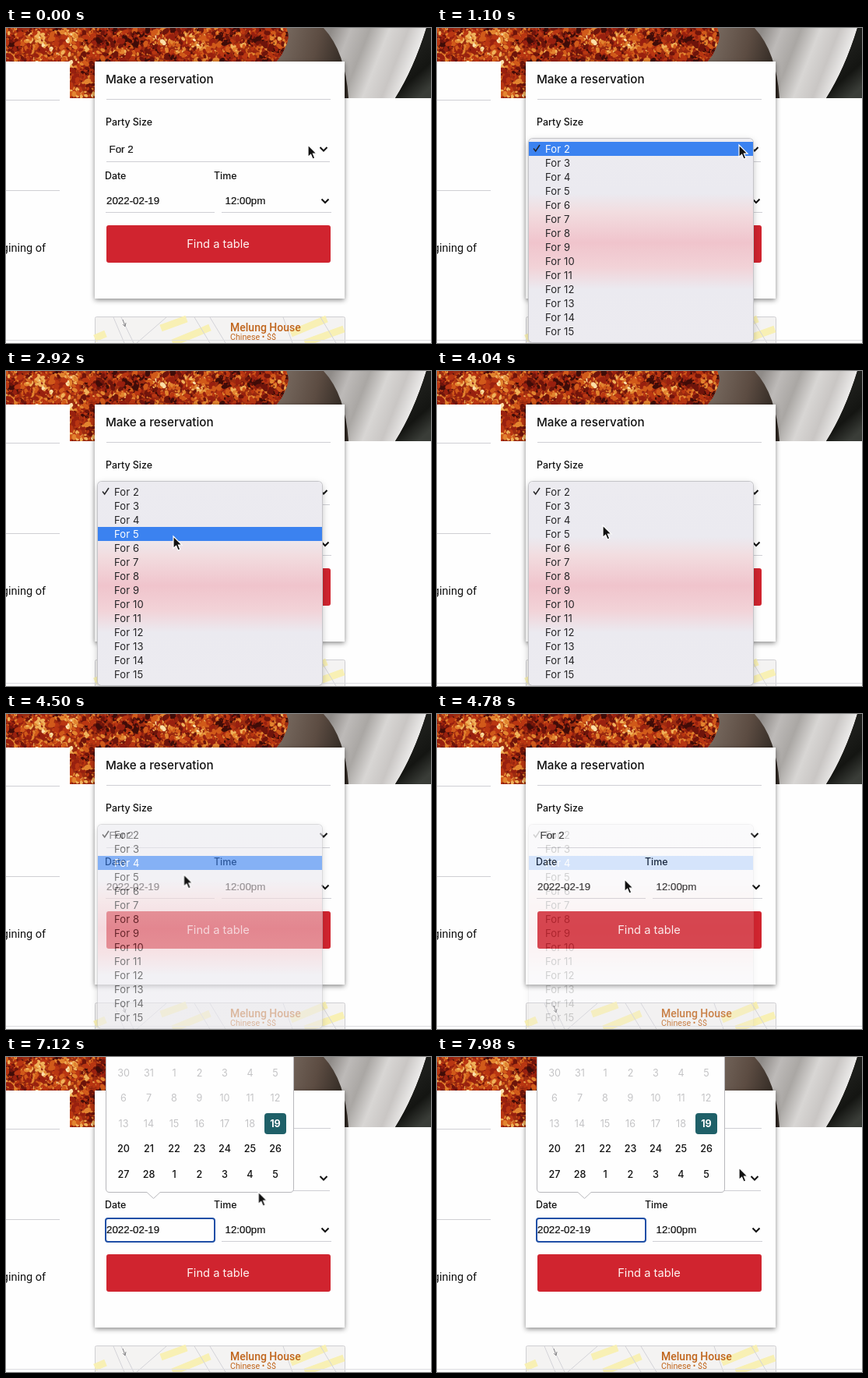
An HTML page with a canvas for the animation above (8 s loop, 546 by 404 pixels).

```html
<!DOCTYPE html>
<html lang="en">
<head>
<meta charset="utf-8">
<title>Table reservation</title>
<style>
  html, body { margin: 0; width: 100%; height: 100%; overflow: hidden; background: #fefefe; }
  #stage { position: absolute; inset: 0; width: 546px; height: 404px; overflow: hidden; }
  #stage > * { position: absolute; left: 0; top: 0; }
  svg { overflow: visible; }
  text { font-family: Inter, sans-serif; fill: #111; }
  .label { font-size: 12.4px; font-weight: 500; }
  .value { font: 13.33px "Liberation Sans", Arial, sans-serif; stroke: #111; stroke-width: .2px; }
  .rule { stroke: #cfcfd4; }
  .ring { fill: #fefefe; stroke: #1f4fa6; stroke-width: 2; }
  .chevron { fill: none; stroke: #111; stroke-width: 2; }
  .place { font-family: Roboto, sans-serif; fill: #c0651c; }
  .day { font-size: 12.6px; font-weight: 500; text-anchor: middle; }
  .muted { fill: #c4c4c6; font-weight: 400; }
  .chosen { fill: #fff; font-weight: 700; }

  #menu {
    left: 118px; top: 142px; width: 288px; height: 261px; border-radius: 5px;
    font: 13px/18px Inter, sans-serif; letter-spacing: .15px; color: #242426;
    background: linear-gradient(#ecebf0, #ebeaf0 27%, #f2dde0 36%, #f0c4cc 51%, #f2d2d7 63%, #ebeaf0 74%, #ecebf0);
    box-shadow: 0 0 0 1px #c4c4c8, 0 3px 10px #0004;
  }
  #menu ul {
    position: absolute; inset: 0; margin: 0; padding: 4px 0 0 21px;
    list-style: none; border-radius: 5px;
  }
  #menu .lit {
    color: #fff; background: #3b82f0;
    clip-path: inset(calc(4px + 18px * var(--row)) 0 calc(239px - 18px * var(--row)));
  }
  #menu svg { position: absolute; left: 5px; top: 7px; }

  /* One shared 8 s timeline */
  #menu, .lit, .before, .after, .focus, .opened, #cursor, .arrow, .beam {
    animation: 8s linear infinite;
  }
  #menu { animation-name: menu; }
  #menu .lit { animation-name: pick; animation-timing-function: step-end; }
  .before, .after, .focus, .opened, .arrow, .beam { animation-timing-function: step-end; }
  .before { animation-name: before; }
  .after { animation-name: after; }
  .focus { animation-name: focus; }
  .opened { animation-name: opened; }
  .arrow { animation-name: arrow; }
  .beam { animation-name: beam; }
  #cursor { animation-name: move; }

  @keyframes menu {
    0%, 13.74% { opacity: 0; }
    13.75%, 53% { opacity: 1; }
    61.5%, 100% { opacity: 0; }
  }
  @keyframes pick {
    0% { --row: 0; }
    16.7% { --row: 1; }
    19.5% { --row: 2; }
    22.3% { --row: 3; }
    48.5% { --row: 2; }
    50% { --row: 20; }
    51.25%, 100% { --row: 2; }
  }
  @keyframes before { 0% { opacity: 1; } 62%, 100% { opacity: 0; } }
  @keyframes after { 0% { opacity: 0; } 62%, 100% { opacity: 1; } }
  @keyframes focus { 0% { opacity: 0; } 62% { opacity: 1; } 76.5%, 100% { opacity: 0; } }
  @keyframes opened { 0% { opacity: 0; } 76.5%, 100% { opacity: 1; } }
  @keyframes arrow { 0% { opacity: 1; } 62% { opacity: 0; } 84%, 100% { opacity: 1; } }
  @keyframes beam { 0% { opacity: 0; } 62% { opacity: 1; } 84%, 100% { opacity: 0; } }
  @keyframes move {
    0%, 14.4% { transform: translate(388px, 150px); }
    24.25% { transform: translate(262px, 212px); }
    36.5% { transform: translate(215px, 212px); }
    50.5%, 52% { transform: translate(213px, 198px); }
    59.75% { transform: translate(241px, 212px); }
    70.25% { transform: translate(230px, 219px); }
    79% { transform: translate(230px, 219px); animation-timing-function: ease-in-out; }
    97%, 100% { transform: translate(388px, 142px); }
  }
</style>
</head>
<body>
<div id="stage">
  <canvas id="photo" width="546" height="90"></canvas>

  <svg width="546" height="404">
    <rect y="43" width="82" height="361" fill="#fefefe"/>
    <path class="rule" d="M0 92.5H69M0 208.5H69"/>
    <text x="51" y="287" text-anchor="end" style="font:14.5px Roboto,sans-serif">gining of</text>

    <g id="map">
      <rect x="114.500" y="370.500" width="321" height="40" rx="2" fill="#f4f3f2" stroke="#cfcfd2"/>
      <g fill="none" stroke="#f8f0b4" stroke-width="9">
        <path d="M114 398L128 392M199 385L232 373M214 404L262 384M366 392L412 373M384 404L434 386"/>
      </g>
      <g fill="none" stroke="#d3d3d8">
        <path d="M138 371L152 404M148 371L164 404M168 404L206 371M242 371L262 404M262 371L282 404M356 371L368 404M404 371L424 404"/>
      </g>
      <path d="M150 374l3 8m-3-2l3 3 1-5" fill="none" stroke="#8a8a8c"/>
      <text class="place" x="288" y="389" font-size="14" font-weight="500">Melung House</text>
      <text class="place" x="288" y="400" font-size="10.700">Chinese • $$</text>
    </g>
    <path d="M0 400.500H546" stroke="#dcdce0"/>

    <rect x="114" y="43" width="321" height="304" fill="#fefefe" style="filter:drop-shadow(0 2px 3px #0007)"/>
    <text x="128" y="71" font-size="15.200" font-weight="500">Make a reservation</text>
    <path class="rule" d="M129 91.500H417M129 171.500H416M128 236.500H268M277 236.500H418"/>
    <text class="label" x="128" y="125">Party Size</text>
    <rect class="ring focus" x="129" y="139" width="287" height="33" rx="3"/>
    <text class="value before" x="132.500" y="160">For 2</text>
    <text class="value after" x="132.500" y="160">For 4</text>
    <path class="chevron" d="M403.500 153l4.500 4.500 4.500-4.500M405.500 219.500l4.500 4.500 4.500-4.500"/>
    <text class="label" x="127" y="194">Date</text>
    <text class="label" x="267" y="194">Time</text>
    <rect class="ring opened" x="128" y="207" width="140" height="30" rx="3"/>
    <text class="value" x="129" y="226">2022-02-19</text>
    <text class="value" x="281.500" y="226">12:00pm</text>
    <rect x="129" y="253" width="288" height="48" rx="3" fill="#d0242f"/>
    <text x="272.500" y="282" font-size="14.700" text-anchor="middle" style="fill:#fff4f2">Find a table</text>

    <g id="calendar" class="opened">
      <path d="M128.500 -10V169q0 4.500 4.500 4.500H181l8.500 8 8.500-8H365q4.500 0 4.500-4.500V-10z" fill="#fefefe" stroke="#b8b8bc"/>
      <rect x="332" y="72" width="28" height="27" rx="4" fill="#1f6068"/>
    </g>
  </svg>

  <div id="menu">
    <ul></ul>
    <ul class="lit"></ul>
    <svg width="10" height="10"><path d="M1 5.500L3.700 9 9 1" fill="none" stroke="#242426" stroke-width="1.500"/></svg>
  </div>

  <svg id="cursor" width="1" height="1">
    <path class="arrow" d="M0 0V15.500L3.600 12.200 6 18 8.800 16.800 6.400 11.200H11z" fill="#111" stroke="#fff" stroke-width="1.200"/>
    <g class="beam" fill="none">
      <path id="bar" d="M-3.500 -7.500Q0 -7.500 0 -5.500Q0 -7.500 3.500 -7.500M0 -6V6M-3.500 7.500Q0 7.500 0 5.500Q0 7.500 3.500 7.500M-2 2.500H2" stroke="#111" stroke-width="1.300"/>
    </g>
  </svg>
</div>

<script>
  // Party sizes
  const items = Array.from({ length: 14 }, (_, i) => `<li>For ${i + 2}</li>`).join('');
  document.querySelectorAll('#menu ul').forEach(list => { list.innerHTML = items; });

  // Calendar: five weeks starting on 30 January 2022
  const calendar = document.getElementById('calendar');
  for (let i = 0; i < 35; i++) {
    const day = document.createElementNS('http://www.w3.org/2000/svg', 'text');
    day.textContent = new Date(2022, 0, 30 + i).getDate();
    day.setAttribute('x', 151 + (i % 7) * 32.5);
    day.setAttribute('y', 24.7 + Math.floor(i / 7) * 32.5);
    day.setAttribute('class', 'day' + (i < 20 ? ' muted' : i === 20 ? ' chosen' : ''));
    calendar.append(day);
  }

  // Soft stand-in for the food photograph
  const ctx = document.getElementById('photo').getContext('2d');
  let seed = 11;
  const random = () => (seed = (seed * 16807) % 2147483647) / 2147483647;

  function fillPath(path, fill) {
    ctx.fillStyle = fill;
    ctx.fill(new Path2D(path));
  }
  function gradient(x0, y0, x1, y1, ...colors) {
    const g = ctx.createLinearGradient(x0, y0, x1, y1);
    colors.forEach((c, i) => g.addColorStop(i / (colors.length - 1), c));
    return g;
  }

  fillPath('M0 0H546V90H0z', gradient(360, 10, 440, 30, '#74665c', '#5c4c42', '#2f2822'));
  fillPath('M408 0H540Q524 52 500 90H440Q436 30 408 0z',
    gradient(415, 10, 522, 52, '#8f8b88', '#bdbab8', '#aaa7a4', '#d8d6d4', '#c9c6c4', '#eeedec'));
  fillPath('M540 0H546V90H500Q524 52 540 0z', gradient(515, 40, 546, 75, '#1c1d1a', '#141512', '#3a3d38'));

  ctx.save();
  ctx.clip(new Path2D('M0 0H360Q366 12 358 26Q352 42 336 52L318 90H0z'));
  fillPath('M0 0H370V90H0z', '#9c2c10');
  const tones = ['#3f0c08', '#6e140b', '#98200f', '#b93612', '#d15a1a', '#e2842f', '#f0b25a', '#fbe0a8'];
  for (let i = 0; i < 4000; i++) {
    const x = random() * 370, y = random() * 90;
    const size = 0.8 + 2.6 * random() ** 2;
    // Lumps of crust catch the light, the sauce between them stays dark
    const lump = Math.sin(x / 13 + Math.sin(y / 9) * 2) * Math.cos(y / 11 + Math.sin(x / 23) * 2);
    const level = 0.42 + 0.27 * lump + 0.6 * (random() - 0.5);
    const tone = Math.floor(Math.max(0, Math.min(0.99, level)) * tones.length);
    ctx.fillStyle = tones[tone];
    ctx.beginPath();
    ctx.ellipse(x, y, size * 1.5, size, random() * 3, 0, 7);
    ctx.fill();
  }
  ctx.restore();
</script>
</body>
</html>
```
